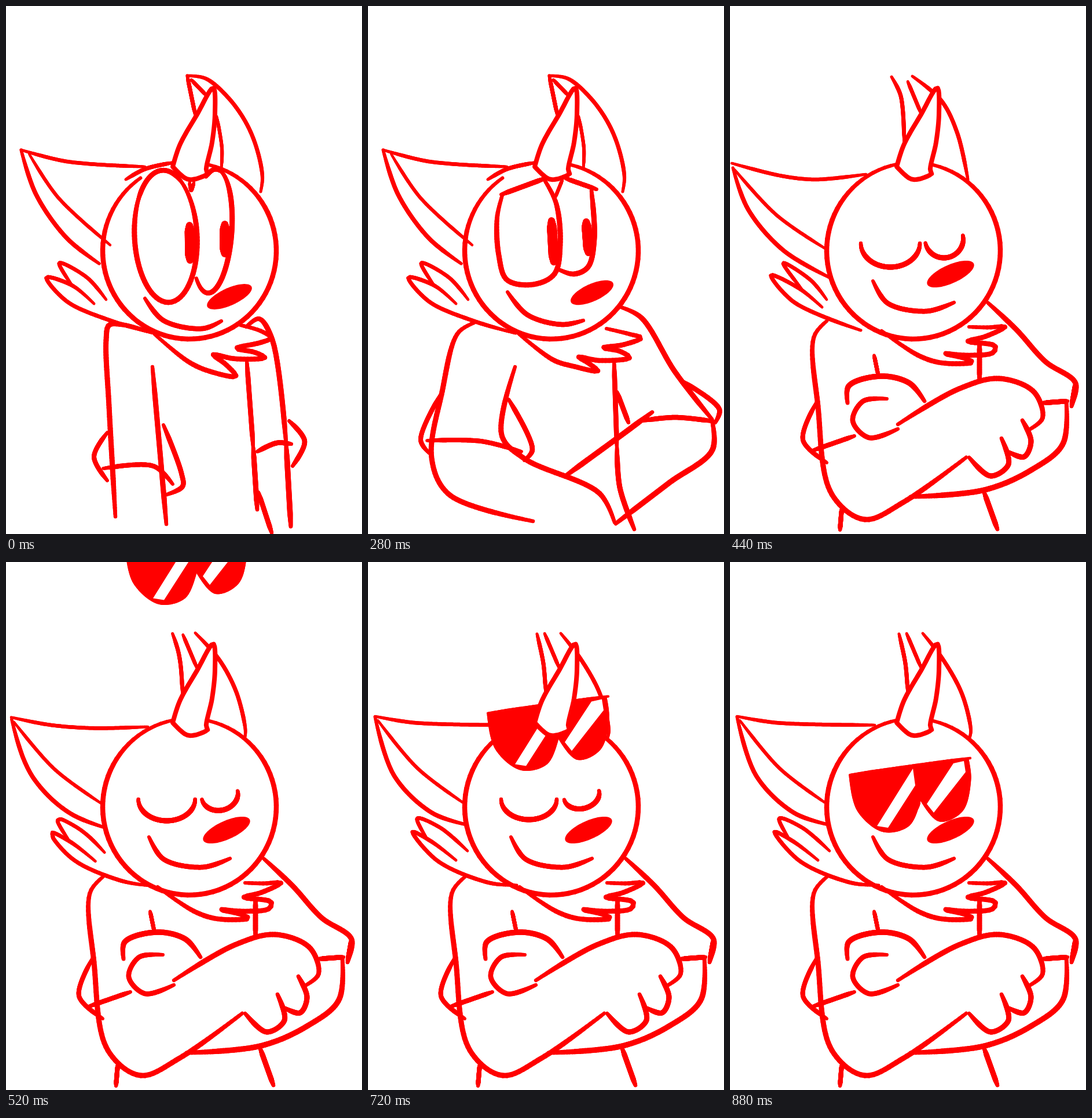
These frames come from a looping animation (615x910 px, 1320 ms). An HTML page with a canvas:

```html
<!DOCTYPE html>
<html lang="en">
<head>
<meta charset="utf-8">
<title>Cool pose</title>
<style>
html, body { margin: 0; width: 100%; height: 100%; overflow: hidden; background: #fff; }
canvas { display: block; }
</style>
</head>
<body>
<canvas id="stage" width="615" height="910"></canvas>
<script>
const ctx = document.getElementById('stage').getContext('2d');
const RED = '#f00', WHITE = '#fff', PI = Math.PI;
const LOOP = 1320, STEP = 40, N = 80;
const POSE_TIMES = [0, 160, 280, 440, 560];

const mix = (a, b, k) => a + (b - a) * k;
const dist = (a, b) => Math.hypot(b[0] - a[0], b[1] - a[1]);
const parse = s => s.split(' ').map(p => p.split(',').map(Number));

function ellipse(cx, cy, rx, ry, turn = 0, from = 0, to = 2 * PI) {
  const c = Math.cos(turn), s = Math.sin(turn);
  return Array.from({ length: N + 1 }, (_, i) => {
    const a = mix(from, to, i / N), x = rx * Math.cos(a), y = ry * Math.sin(a);
    return [cx + x * c - y * s, cy + x * s + y * c];
  });
}

// Centripetal spline through a few points
function spline(pts) {
  const gap = (a, b) => Math.sqrt(dist(a, b)) || 1;
  const speed = pts.map((p, i) => {
    const a = pts[i - 1] || p, b = pts[i + 1] || p, d = gap(a, p), e = gap(p, b);
    return [0, 1].map(c => ((p[c] - a[c]) * e / d + (b[c] - p[c]) * d / e) / (d + e));
  });
  const out = [pts[0]];
  for (let i = 1; i < pts.length; i++) {
    const a = pts[i - 1], b = pts[i], e = gap(a, b);
    for (let j = 1; j <= 12; j++) {
      const t = j / 12, u = 1 - t;
      out.push([0, 1].map(c =>
        u * u * (1 + 2 * t) * a[c] + t * t * (3 - 2 * t) * b[c] +
        t * u * e * (u * speed[i - 1][c] - t * speed[i][c])));
    }
  }
  return out;
}

// N + 1 points at equal distances, so that any two curves can be blended
function even(pts) {
  const len = [0];
  for (let i = 1; i < pts.length; i++) len.push(len[i - 1] + dist(pts[i - 1], pts[i]));
  const end = pts.length - 1;
  return Array.from({ length: N + 1 }, (_, i) => {
    const d = len[end] * i / N;
    const j = Math.max(1, len.findIndex(l => l >= d - 1e-6));
    const k = (d - len[j - 1]) / (len[j] - len[j - 1] || 1);
    return [0, 1].map(c => mix(pts[j - 1][c], pts[j][c], k));
  });
}

const curve = shape => even(typeof shape === 'string' ? spline(parse(shape)) : shape);

// One shape per pose: 0 or missing repeats the last one, '' hides the part
function poses(shapes) {
  const list = [];
  POSE_TIMES.forEach((_, i) => {
    list.push(shapes[i] ? curve(shapes[i]) : shapes[i] === '' ? null : list[i - 1]);
  });
  return list;
}

const lines = [];
const line = (width, ...shapes) => lines.push({ width, shapes: poses(shapes) });

// Head
const head = start => ellipse(317, 422, 150, 152, 0, start, -7.62);
line(8.5, head(-2.17), 0, 0, head(-1.76));
line(7, '207,299 240,281 288,270', 0, 0, '');

// Right ear
line(7, '313,120 327,188', 0, 0, '279,122 295,155 301,235', '292,124 303,175 307,225');
line(6.5, '320,127 346,154', 0, 0, '307,130 330,185', '305,123 330,182');
line(7, '313,120 345,125 383,157 414,200 433,245 443,295 440,320', 0, 0,
  '315,121 365,163 393,220 411,299', '333,123 368,168 401,228 416,290 414,303');
line(6, '364,190 373,245 372,280', 0, 0, '');

// Left ear
line(6.5, '26,248 105,268 240,277', 0, 0, '3,271 90,293 150,299 235,290', '12,266 80,277 250,281');
line(7.5, '26,248 52,325 105,400 161,444', 0, 0,
  '5,279 31,350 92,421 172,468', '12,267 45,368 110,432 171,453');
line(6, '40,255 90,330 180,412', 0, 0, '7,281 80,360 166,419', '17,273 85,355 166,416');

// Fur
line(6.5, '173,506 140,468 92,443 115,483', 0, 0,
  '167,506 140,473 92,443 124,488', '172,498 125,458 85,442 103,479');
line(7, '152,513 115,482 70,468 105,509 180,542 255,564', 0, 0,
  '159,519 120,487 71,464 110,510 226,559', '152,514 110,482 77,465 120,515 210,553 257,557');
line(8.5, '257,566 315,613 350,629 397,638 380,618 358,601 395,608 447,606 430,597 398,590 440,580 458,572 440,560 405,550', 0,
  '257,562 320,610 355,621 397,629 380,615 364,605 400,611 452,606 435,595 406,589 440,584 472,572 450,565 412,556',
  '262,560 325,602 365,615 419,614 405,607 371,599 410,602 455,597 458,586 411,578 440,570 475,553 445,554 413,553');

// Eyes and lids close into the same arc
const shutL = [ellipse(277, 409, 51, 41, 0, PI, 0), ellipse(278, 409, 48, 35, 0, PI, 0)];
const shutR = [ellipse(370, 402, 33, 32, -0.2, PI, 0), ellipse(369, 402, 31, 23, -0.25, PI, 0)];
const eyeL = (from, to) => ellipse(276, 397, 54, 114, -0.05, from, to);
const eyeR = (from, to) => ellipse(356, 388, 34, 107, 0.07, from, to);
line(9, eyeL(-2.2, -7.2), 0, '232,326 223,365 226,430 240,472 285,480 322,462 332,410 325,340 305,300', ...shutL);
line(8.5, eyeL(-2.6, -0.92), 0, '230,325 306,297', ...shutL);
line(9, eyeR(2.25, -1.3), 0, '327,453 355,462 380,450 391,400 386,318', ...shutR);
line(8, eyeR(-2.1, -1.3), 0, '341,297 395,316', ...shutR);
line(6, '317,303 320,318 325,303', 0, '323,331 336,299', '');
line(17, '317,378 318,438', 0, '317,370 321,441', '');
line(17, '378,376 378,427', 0, '377,372 381,425', '');

// Mouth
line(8.5, '240,504 272,542 340,556 372,543', 0, '241,493 275,532 335,549 372,542', '247,474 272,512 340,526 387,511');

// Left arm
line(9, '250,562 200,549 178,550 173,575 178,690 189,880',
  '188,545 171,556 146,690 136,790 175,889',
  '183,546 155,564 128,665 110,780 140,842 285,888',
  '167,543 145,570 152,690 175,840 232,885 300,855 408,778');
line(9, '253,622 277,893', '249,633 244,740 258,825 309,899',
  '254,622 231,740 270,780 400,840 426,890',
  '290,721 395,660 465,642 525,665 540,710 519,729');
line(8, '175,735 152,777 175,818', '142,698 107,760 133,802', '125,670 91,748 106,771', '150,682 126,748 167,787');
line(8, '168,797 255,793 288,824', '128,774 225,777 266,792', '102,749 195,750 265,768', '143,766 215,741');
line(8.5, '272,722 303,805 305,828 278,842', '251,682 293,785 290,807 258,818', '243,678 284,765 270,783',
  '271,677 230,681 212,715 240,744 290,729');
line(7, '', '', '', '249,602 256,636');
line(9, '', '', '', '413,778 450,810 481,790 469,745');
line(9, '', '', '', '480,768 508,777 520,750 505,714');

// Right arm
line(9, '415,553 437,539 460,575 484,755', '405,552 437,534 460,570 514,775',
  '437,519 472,537 530,630 594,712', '445,511 495,558 545,613 597,650 590,690');
line(9.5, '484,755 492,897', '514,775 516,830 505,897',
  '594,712 595,765 520,822 428,892', '581,681 575,755 520,800 440,834 312,846');
line(8.5, '434,768 468,753 493,755', '437,770 485,757 518,765', '472,715 530,709 598,716', '541,684 583,681');
line(8.5, '489,715 516,750 495,793', '502,697 536,755 517,790', '540,645 607,695 600,718', '597,650 590,690');
line(9.5, '', '', '491,700 440,738 341,810', '336,681 310,650 260,638 205,655 203,684');

// Torso
line(8.5, '416,612 427,760', '420,615 432,750', '425,612 430,760', '431,580 431,645');
line(9, '427,760 434,868', '432,750 440,855 454,895', '430,760 435,830 460,902', '439,838 462,902');
line(8.5, '436,838 459,908', '', '430,665 450,718', '');
line(8, '', '', '', '193,866 190,903');

const nose = poses([
  ellipse(386, 501, 42, 15, -0.42), 0,
  ellipse(387, 494, 40, 15, -0.42),
  ellipse(381, 462, 44, 16, -0.42)
]);
const horn = curve('288,277 300,240 330,187 358,141 361,185 356,235 346,284 349,288 328,298 312,298 288,277');
const brow = curve('207,367 320,351 415,338');
const lenses = ['207,368 222,428 265,463 308,453 328,410', '330,410 362,445 400,428 414,375 411,341'].map(curve);
const glints = ['254,455 273,458 320,385 316,356', '340,417 352,432 407,362 404,343 386,347'].map(parse);

function stroke(pts, width) {
  for (let i = 0; i < N; i++) {
    const f = i / N;
    // The pen presses harder away from the ends
    ctx.lineWidth = width * (0.7 + 0.3 * Math.min(1, 6 * f, 6 * (1 - f)));
    ctx.beginPath();
    ctx.moveTo(...pts[i]);
    ctx.lineTo(...pts[i + 1]);
    ctx.stroke();
  }
}

function fill(pts, color, outline = 0) {
  ctx.beginPath();
  pts.forEach(p => ctx.lineTo(...p));
  ctx.closePath();
  ctx.fillStyle = color;
  ctx.fill();
  if (!outline) return;
  ctx.lineWidth = outline;
  ctx.stroke();
}

// The first pose is held and then cuts, the others flow together
function shapeAt(shapes, t) {
  let i = POSE_TIMES.length - 1;
  while (t < POSE_TIMES[i]) i--;
  const a = shapes[i], b = shapes[i + 1];
  if (i === 0 || i === POSE_TIMES.length - 1) return a;
  const k = (t - POSE_TIMES[i]) / (POSE_TIMES[i + 1] - POSE_TIMES[i]);
  if (!a || !b) return k < 0.5 ? a : b;
  return a.map((p, n) => [mix(p[0], b[n][0], k), mix(p[1], b[n][1], k)]);
}

// Steady fall, slight overshoot, then rest
function drawGlasses(t) {
  const drop = t < 800 ? 1.43 * (t - 600) - 278 : Math.max(0, 8 - (t - 800) / 10);
  ctx.save();
  ctx.translate(0, drop);
  fill([...lenses[0], ...lenses[1], ...brow.slice().reverse()], RED);
  glints.forEach(g => fill(g, WHITE));
  lenses.forEach(l => stroke(l, 5));
  stroke(brow, 6);
  ctx.restore();
}

function draw(t) {
  ctx.fillStyle = WHITE;
  ctx.fillRect(0, 0, 615, 910);
  ctx.strokeStyle = RED;
  ctx.lineCap = ctx.lineJoin = 'round';
  for (const { width, shapes } of lines) {
    const pts = shapeAt(shapes, t);
    if (pts) stroke(pts, width);
  }
  fill(shapeAt(nose, t), RED);
  drawGlasses(t);
  fill(horn, WHITE, 8);
}

let shown = -1;
function tick() {
  const t = Math.floor(performance.now() % LOOP / STEP) * STEP;
  if (t !== shown) draw(shown = t);
  requestAnimationFrame(tick);
}
tick();
</script>
</body>
</html>
```
